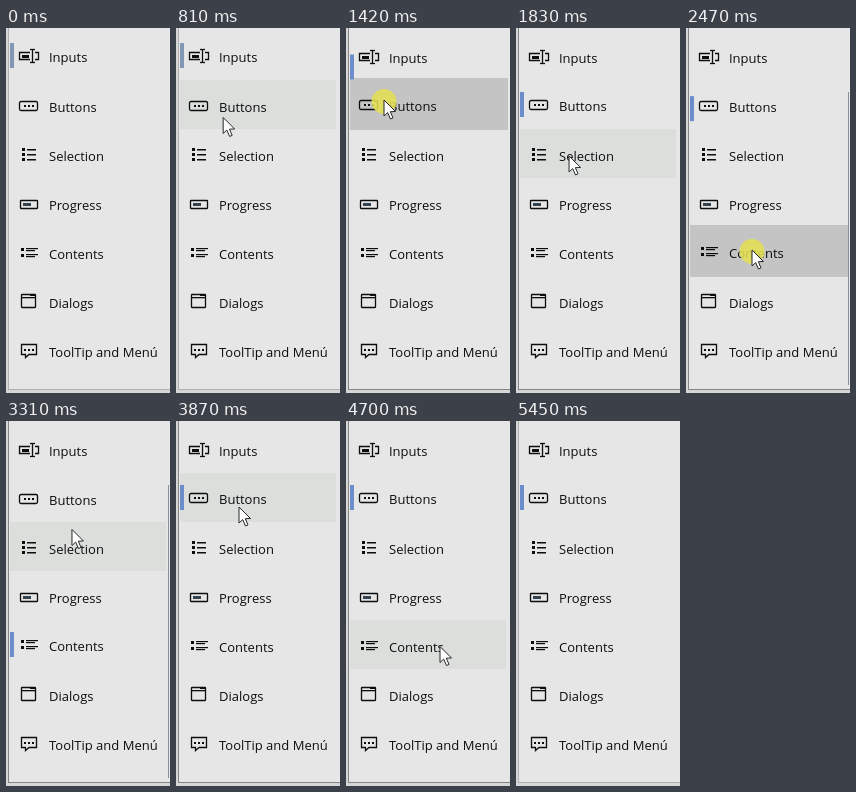
These frames come from a looping animation (164 by 365 pixels, 5520 ms). An HTML page with a canvas:

```html
<!DOCTYPE html>
<html lang="en">
<head>
<meta charset="utf-8">
<title>Navigation menu</title>
<style>
html, body { margin: 0; width: 100%; height: 100%; overflow: hidden; background: #e6e6e6; }
canvas { display: block; width: 164px; height: 365px; }
</style>
</head>
<body>
<canvas id="stage"></canvas>
<script>
const W = 164, H = 365, LOOP = 5520, ROW = 49, TOP = 3, SLIDE = 280, PRESS = 140;
const INK = '#0c0d0f';
const canvas = document.getElementById('stage');
const ctx = canvas.getContext('2d');
const ratio = window.devicePixelRatio || 1;
canvas.width = Math.round(W * ratio);
canvas.height = Math.round(H * ratio);

const labels = ['Inputs', 'Buttons', 'Selection', 'Progress', 'Contents', 'Dialogs', 'ToolTip and Menú'];

const linear = k => k;
const easeOut = k => 1 - (1 - k) ** 3;
const easeInOut = k => (1 - Math.cos(Math.PI * k)) / 2;
const progress = (t, start, length) => Math.min(1, Math.max(0, (t - start) / length));

// Pointer moves; bow bends the path sideways
const moves = [
  { start: 390, end: 1090, x: 38, y: 72, bow: 10, ease: easeOut },
  { start: 1420, end: 2400, x: 66, y: 222, bow: 5, ease: easeInOut },
  { start: 2540, end: 3590, x: 63, y: 86, bow: 5, ease: easeInOut },
  { start: 4350, end: 5050, x: 125, y: 365, bow: 0, ease: linear }
];
const clicks = [
  { press: 1420, slide: 1330, row: 1 },
  { press: 2400, slide: 2440, row: 4 },
  { press: 3660, slide: 3590, row: 1 }
];

// Time advances in 70 ms steps, restarted after each pause
const bursts = [0, 390, 1420, 1830, 1910, 4420, 5450];
function snap(t) {
  const base = bursts.filter(b => b <= t).pop();
  return base + Math.floor((t - base) / 70) * 70;
}

function pointerAt(t) {
  let x = 150, y = 345, bend = 0;
  for (const m of moves) {
    const k = m.ease(progress(t, m.start, m.end - m.start));
    x += (m.x - x) * k;
    y += (m.y - y) * k;
    bend += m.bow * Math.sin(Math.PI * k);
  }
  return [x + bend, y];
}

function barTop(t) {
  let row = 0;
  for (const c of clicks) row += (c.row - row) * easeInOut(progress(t, c.slide, SLIDE));
  return 15 + row * ROW;
}

function fill(x, y, w, h, color = INK) {
  ctx.fillStyle = color;
  ctx.fillRect(x, y, w, h);
}

function outline(path) {
  ctx.strokeStyle = INK;
  ctx.lineWidth = 1.3;
  ctx.beginPath();
  path();
  ctx.stroke();
}

const frame = (x, y, w, h, r) => outline(() => ctx.roundRect(x + 0.5, y + 0.5, w - 1, h - 1, r));
const line = (...points) => outline(() => points.forEach(p => ctx.lineTo(...p)));

function dots(x, y) {
  for (let i = 0; i < 3; i++) fill(x + i * 4, y, 2, 2);
}

// Each icon is drawn around y = 0
const icons = [
  () => {
    line([24, -3.5], [13.5, -3.5], [13.5, 3.5], [24, 3.5]);
    fill(16, -1, 7, 3);
    for (const y of [-6.5, 6.5]) line([24, y], [29, y]);
    line([26.5, -6.5], [26.5, 6.5]);
    line([29, -3.5], [32.5, -3.5], [32.5, 3.5], [29, 3.5]);
  },
  () => {
    frame(13, -5, 19, 10, 1.5);
    dots(18, -1);
  },
  () => {
    for (let y = -7; y < 7; y += 5) {
      fill(16, y, 3, 3);
      fill(21, y + 1, 9, 1.5);
    }
  },
  () => {
    frame(14, -4, 18, 9, 0.5);
    fill(17, -1, 8, 3, '#34424f');
  },
  () => {
    for (const y of [-5, 1]) {
      fill(15, y, 3, 3);
      fill(20, y, 12, 1.2);
      fill(20, y + 2, 9, 1.2);
    }
  },
  () => {
    frame(15, -8, 15, 14, 0.5);
    fill(15, -5, 15, 1.3);
    fill(24, -7, 5, 1);
  },
  () => {
    line([20, 3.5], [15.5, 3.5], [15.5, -6.5], [30.5, -6.5], [30.5, 3.5], [23, 3.5], [19.5, 6.5], [19.5, 3.5]);
    dots(18, -2);
  }
];

function drawPointer(x, y) {
  const shape = [[0, 0], [0, 16], [3.7, 12.6], [6.5, 19], [9, 17.9], [6.3, 11.7], [11.5, 11.5]];
  ctx.beginPath();
  shape.forEach(([dx, dy]) => ctx.lineTo(x + dx, y + dy));
  ctx.closePath();
  ctx.fillStyle = '#fff';
  ctx.fill();
  ctx.strokeStyle = '#25272b';
  ctx.lineWidth = 1;
  ctx.stroke();
}

function drawItem(label, i, selected) {
  const lift = i === selected ? 1 : 0;
  ctx.save();
  ctx.translate(0, 29 + i * ROW - lift);
  icons[i]();
  ctx.fillStyle = INK;
  ctx.fillText(label, 43, 6);
  ctx.restore();
}

function drawWindow(t) {
  const active = t >= clicks[0].press && t < 5450;
  const edge = active ? '#858585' : '#b0b0b0';
  fill(0, 0, W, H, '#d6d6d6');
  fill(2, 0, W - 2, 362, edge);
  fill(3, 0, W - 3, 361, '#e6e6e6');
}

function draw(t) {
  const shown = t >= moves[0].start && t < moves[3].end;
  const [px, py] = pointerAt(t);
  const last = clicks.filter(c => t >= c.press).pop();
  const pressed = last && t < last.press + PRESS;

  ctx.setTransform(ratio, 0, 0, ratio, 0, 0);
  drawWindow(t);

  if (pressed) {
    fill(4, TOP + last.row * ROW - 2, 158, ROW + 3, '#c4c4c4');
  } else if (shown) {
    const row = Math.floor((py - TOP) / ROW);
    if (row < labels.length) fill(4, TOP + row * ROW, 156, ROW, '#dcdedb');
  }

  if (t >= clicks[1].press && t < clicks[2].press) fill(162, 64, 1, 293, '#8a9099');
  fill(4, barTop(t), 4, 25, last ? '#6c8dcc' : '#8297b5');

  ctx.font = '13px "Open Sans", "Noto Sans", sans-serif';
  labels.forEach((label, i) => drawItem(label, i, last ? last.row : 0));

  if (pressed) {
    ctx.fillStyle = 'rgba(228, 223, 84, 0.88)';
    ctx.beginPath();
    ctx.arc(px, py + 1.5, 12.5, 0, Math.PI * 2);
    ctx.fill();
  }
  if (shown) drawPointer(px, py);
}

const start = performance.now();
function tick() {
  draw(snap((performance.now() - start) % LOOP));
  requestAnimationFrame(tick);
}
tick();
</script>
</body>
</html>
```
